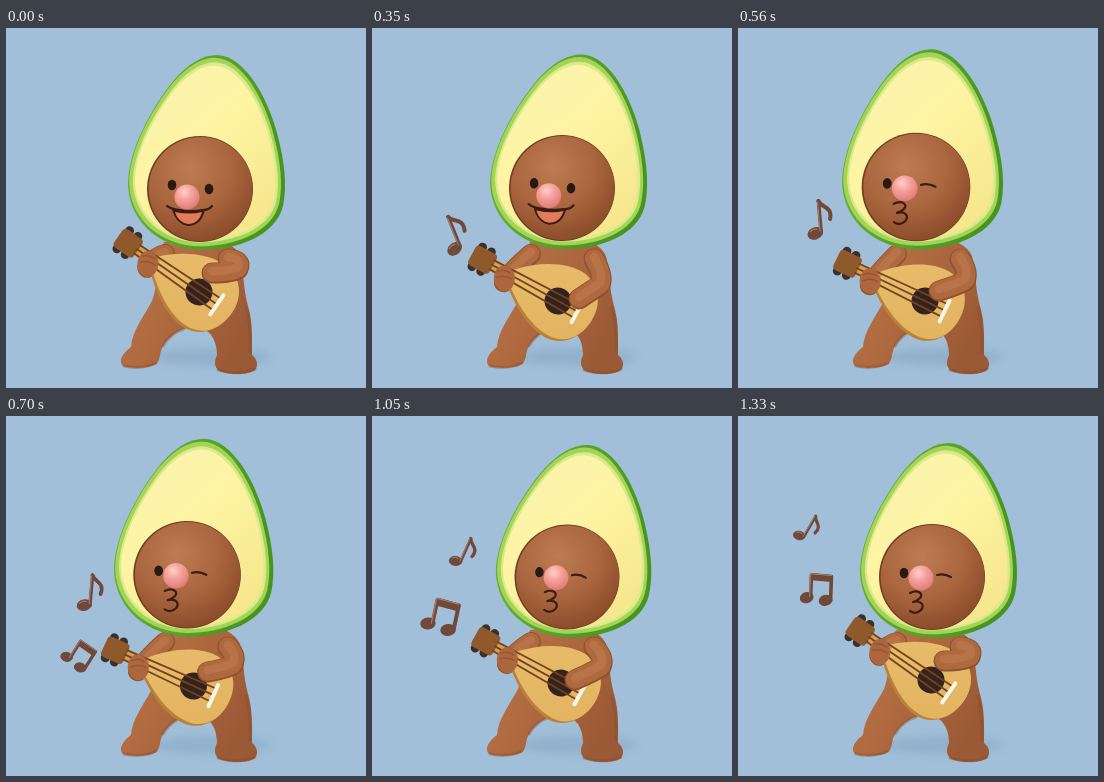
Recreate the animation shown at these times as an HTML page. Size 360 by 360 pixels, loop 1400 ms.

```html
<!DOCTYPE html>
<html lang="en">
<head>
<meta charset="utf-8">
<title>Avocado playing guitar</title>
<style>
  html, body { margin: 0; height: 100%; overflow: hidden; background: #a1bfd8; }
  svg { display: block; width: 100%; height: 100%; }
  .line { fill: none; stroke: #3a1d14; stroke-width: 2.2; stroke-linecap: round; stroke-linejoin: round; }
  .limb { fill: none; stroke-linecap: round; stroke-linejoin: round; }
  .note { fill: #70493a; stroke: #70493a; stroke-linejoin: round; stroke-linecap: round; }
</style>
</head>
<body>
<svg viewBox="0 0 360 360">
  <defs>
    <radialGradient id="seed" cx=".4" cy=".3" r=".72">
      <stop offset="0" stop-color="#bd7c52"/><stop offset=".55" stop-color="#aa663e"/><stop offset="1" stop-color="#8b4c2b"/>
    </radialGradient>
    <radialGradient id="nose" cx=".4" cy=".3" r=".7">
      <stop offset="0" stop-color="#ffd0ca"/><stop offset=".45" stop-color="#f5a19c"/><stop offset="1" stop-color="#e17d78"/>
    </radialGradient>
    <linearGradient id="skin" x1="0" x2="1" y2=".25">
      <stop offset="0" stop-color="#6bb33c"/><stop offset="1" stop-color="#46951f"/>
    </linearGradient>
    <linearGradient id="flesh" x2=".7" y2="1">
      <stop offset="0" stop-color="#f8f3ae"/><stop offset=".5" stop-color="#fef4a3"/><stop offset="1" stop-color="#f6e78d"/>
    </linearGradient>
    <linearGradient id="fur" x2="1" y2=".5">
      <stop offset="0" stop-color="#bb774b"/><stop offset=".5" stop-color="#af693f"/><stop offset="1" stop-color="#9a5a35"/>
    </linearGradient>
    <linearGradient id="wood" x2="1" y2="1">
      <stop offset="0" stop-color="#e8bd6c"/><stop offset="1" stop-color="#e2b35f"/>
    </linearGradient>
    <filter id="soft" x="-30%" y="-60%" width="160%" height="220%"><feGaussianBlur stdDeviation="4"/></filter>
    <path id="avocado" d="M211 27C240 28 262 72 271 105C279 135 281 158 277 178C270 207 232 222 195 222C155 221 124 195 122 158C121 125 145 80 168 52C183 35 197 27 211 27Z"/>
  </defs>

  <ellipse cx="205" cy="329" rx="60" ry="9" fill="#84a5c3" opacity=".55" filter="url(#soft)"/>

  <path fill="url(#fur)" d="M158 214C148 236 153 256 146 273C137 290 126 303 125 319C116 326 113 332 116 337C121 341 143 341 150 336C155 332 153 325 157 318C163 307 176 299 188 299C203 299 211 311 211 327C207 335 209 342 216 344C226 347 243 347 249 342C253 337 251 331 246 327C246 310 247 295 242 278C237 260 238 244 234 228C229 217 215 210 200 210Z"/>
  <path fill="none" stroke="#8b4d2a" stroke-width="3" opacity=".4" stroke-linecap="round" d="M118 338Q135 342 150 335M212 342Q232 348 249 341M157 318Q164 305 178 301M240 280Q245 300 244 324"/>

  <g id="fretArm"></g>

  <g id="guitar">
    <path fill="#b98238" transform="translate(-1 2)" d="M-54 -6C-35 -26 -10 -39 10 -37C30 -34 40 -17 39 1C38 21 26 35 8 36C-14 36 -36 22 -54 6Z"/>
    <path fill="url(#wood)" d="M-54 -6C-35 -26 -10 -39 10 -37C30 -34 40 -17 39 1C38 21 26 35 8 35C-14 35 -36 21 -54 6Z"/>
    <path fill="#d39f52" d="M-80 -6H-50V6H-80Z"/>
    <circle r="13.5" fill="#33221d"/>
    <g fill="#3b302b">
      <circle cx="-92" cy="-11" r="4.5"/><circle cx="-82" cy="-11" r="4.5"/>
      <circle cx="-92" cy="11" r="4.5"/><circle cx="-82" cy="11" r="4.5"/>
    </g>
    <rect x="-98" y="-11" width="24" height="22" rx="4" fill="#8f592c"/>
    <path d="M-76 -5L22 -7M-76 0H22M-76 5L22 7" stroke="#70421f" stroke-width="1.8"/>
    <path d="M22 -11V12" stroke="#fbf5e8" stroke-width="4" stroke-linecap="round"/>
    <g transform="translate(-58 6) rotate(-30)">
      <ellipse rx="10.5" ry="13" fill="#ad673e"/>
      <path d="M-7 -7Q0 -10 7 -5M-8 -1Q0 -4 8 1" fill="none" stroke="#8b4d2a" stroke-width="1.3" opacity=".7"/>
    </g>
  </g>

  <g id="strumArm"></g>

  <g id="head">
    <use href="#avocado" fill="url(#skin)"/>
    <use href="#avocado" fill="#a3d456" transform="translate(5.2 3.6) scale(.967)"/>
    <use href="#avocado" fill="#dcea8e" transform="translate(14.2 9.4) scale(.924)"/>
    <use href="#avocado" fill="url(#flesh)" transform="translate(20 13.5) scale(.894)"/>
    <g transform="translate(194 161)">
      <circle r="53" fill="#6f3d22"/>
      <circle cx=".6" r="52" fill="url(#seed)"/>
      <ellipse cx="-28" cy="-4" rx="4.3" ry="5.2" fill="#2a1814"/>
      <g id="smile">
        <ellipse cx="9" rx="4.3" ry="5.2" fill="#2a1814"/>
        <path d="M-28 20Q-10 24 5 20C3 32 -4 37 -12 37C-20 36 -26 29 -28 20Z" fill="#3a1d14"/>
        <path d="M-25 23Q-10 26 2 23C0 31 -5 35 -12 35C-18 34 -23 30 -25 23Z" fill="#e27a5c"/>
        <path class="line" d="M-33 17Q-27 21 -20 21Q-9 23 3 21Q9 21 12 17"/>
        <circle cx="-13" cy="8" r="12.5" fill="url(#nose)"/>
      </g>
      <g id="kiss">
        <path class="line" d="M5 -2Q12 -4 19 0M-22 16C-14 12 -8 17 -12 21Q-15 24 -19 25C-11 23 -7 28 -11 33Q-16 38 -22 34"/>
        <circle cx="-11" cy="1" r="12.5" fill="url(#nose)"/>
      </g>
    </g>
  </g>

  <g id="single" class="note">
    <ellipse cx="-5" cy="14" rx="7.5" ry="5.5" transform="rotate(-18 -5 14)"/>
    <path d="M1 14V-18" stroke-width="3.6"/>
    <path d="M1 -18C3 -11 15 -12 11 1" fill="none" stroke-width="4"/>
    <path d="M0 12V-17M-10 12Q-7 9 -3 10" fill="none" stroke="#a58270" stroke-width="1"/>
  </g>
  <g id="double" class="note">
    <ellipse cx="-10" cy="10" rx="6.5" ry="5" transform="rotate(-18 -10 10)"/>
    <ellipse cx="9" cy="12" rx="6.5" ry="5" transform="rotate(-18 9 12)"/>
    <path d="M-6 10V-13L14 -12V12" fill="none" stroke-width="3.6"/>
    <path d="M-6 -13L14 -12V-8L-6 -9Z" stroke-width="3"/>
    <path d="M-7 9V-14L14 -13" fill="none" stroke="#a58270" stroke-width="1"/>
  </g>
</svg>
<script>
const LOOP = 1400, STEP = 70, WINK = 490;
const $ = id => document.getElementById(id);

// time, head x y angle scale, guitar x y angle, hand x y, elbow x y
const poses = [
  [0,    194, 161, 0,   1,     193, 264, 34.6, 206, 245, 232, 241],
  [210,  197, 162, 2.3, .985,  186, 271, 32.9, 207, 273, 229, 258],
  [350,  190, 160, 1.4, 1,     186, 273, 28.7, 207, 271, 228, 257],
  [560,  178, 159, -1,  1.025, 187, 273, 25.7, 201, 263, 227, 253],
  [840,  187, 159, 1.3, 1,     188, 267, 24.5, 203, 252, 227, 246],
  [1050, 195, 161, 1.8, .99,   189, 267, 29,   203, 264, 229, 251]
];
const at = (pose, time) => [time, ...pose.slice(1)];
const dance = [at(poses[0], -STEP), ...poses, at(poses[0], LOOP - STEP), at(poses[0], LOOP), at(poses[1], LOOP + 210)];

// time, x, y, angle, scale
const single = [[280, 88, 214, -28, .6], [350, 82, 206, -22, 1], [560, 81, 191, -5, 1], [840, 88, 160, 14, .9], [1050, 92, 136, 24, .83], [1330, 70, 112, 30, .78]];
const double = [[700, 73, 238, 32, .9], [840, 72, 222, 25, 1.25], [1050, 69, 199, 12, 1.1], [1330, 79, 172, 2, 1]];

// Hermite curve through keys at uneven times
function spline(keys, t) {
  const last = keys.length - 1;
  let i = 0;
  while (i < last - 1 && t >= keys[i + 1][0]) i++;
  const a = keys[i], b = keys[i + 1];
  const before = keys[Math.max(i - 1, 0)], after = keys[Math.min(i + 2, last)];
  const span = b[0] - a[0], u = (t - a[0]) / span;
  return a.slice(1).map((p, k) => {
    const q = b[k + 1];
    const m = (q - before[k + 1]) / (b[0] - before[0]) * span;
    const n = (after[k + 1] - p) / (after[0] - a[0]) * span;
    return p + u * (m + u * (3 * (q - p) - 2 * m - n + u * (2 * (p - q) + m + n)));
  });
}

const place = (id, x, y, angle, scale = 1, tail = '') =>
  $(id).setAttribute('transform', `translate(${x} ${y}) rotate(${angle}) scale(${scale}) ${tail}`);
const show = (id, on) => $(id).setAttribute('display', on ? 'inline' : 'none');

function limb(id, d, width) {
  $(id).innerHTML = [['#8e502d', 0, 0], ['#af693f', 2.5, -.6], ['#b87448', width * .6, -2]]
    .map(([color, inset, dy]) => `<path class="limb" d="${d}" stroke="${color}" stroke-width="${width - inset}" transform="translate(0 ${dy})"/>`).join('');
}

function moveNote(id, keys, t) {
  const on = t >= keys[0][0];
  show(id, on);
  if (on) place(id, ...spline(keys, t));
}

function draw(t) {
  const [hx, hy, tilt, size, gx, gy, angle, handX, handY, elbowX, elbowY] = spline(dance, t);
  place('head', hx, hy, tilt, size, 'translate(-194 -161)');
  place('guitar', gx, gy, angle);
  const r = angle * Math.PI / 180;
  const gripX = gx - 58 * Math.cos(r) - 7 * Math.sin(r), gripY = gy - 58 * Math.sin(r) + 7 * Math.cos(r);
  limb('fretArm', `M159 226Q${gripX + 8} ${gripY - 9} ${gripX} ${gripY + 3}`, 20);
  limb('strumArm', `M222 231Q${elbowX + 4} ${elbowY - 9} ${elbowX} ${elbowY}Q${elbowX - 6} ${elbowY + 4} ${handX} ${handY}`, 21);
  show('smile', t < WINK);
  show('kiss', t >= WINK);
  moveNote('single', single, t);
  moveNote('double', double, t);
}

const start = performance.now();
function tick() {
  const t = (performance.now() - start) % LOOP;
  draw(Math.floor(t / STEP) * STEP);
  requestAnimationFrame(tick);
}
tick();
</script>
</body>
</html>
```
